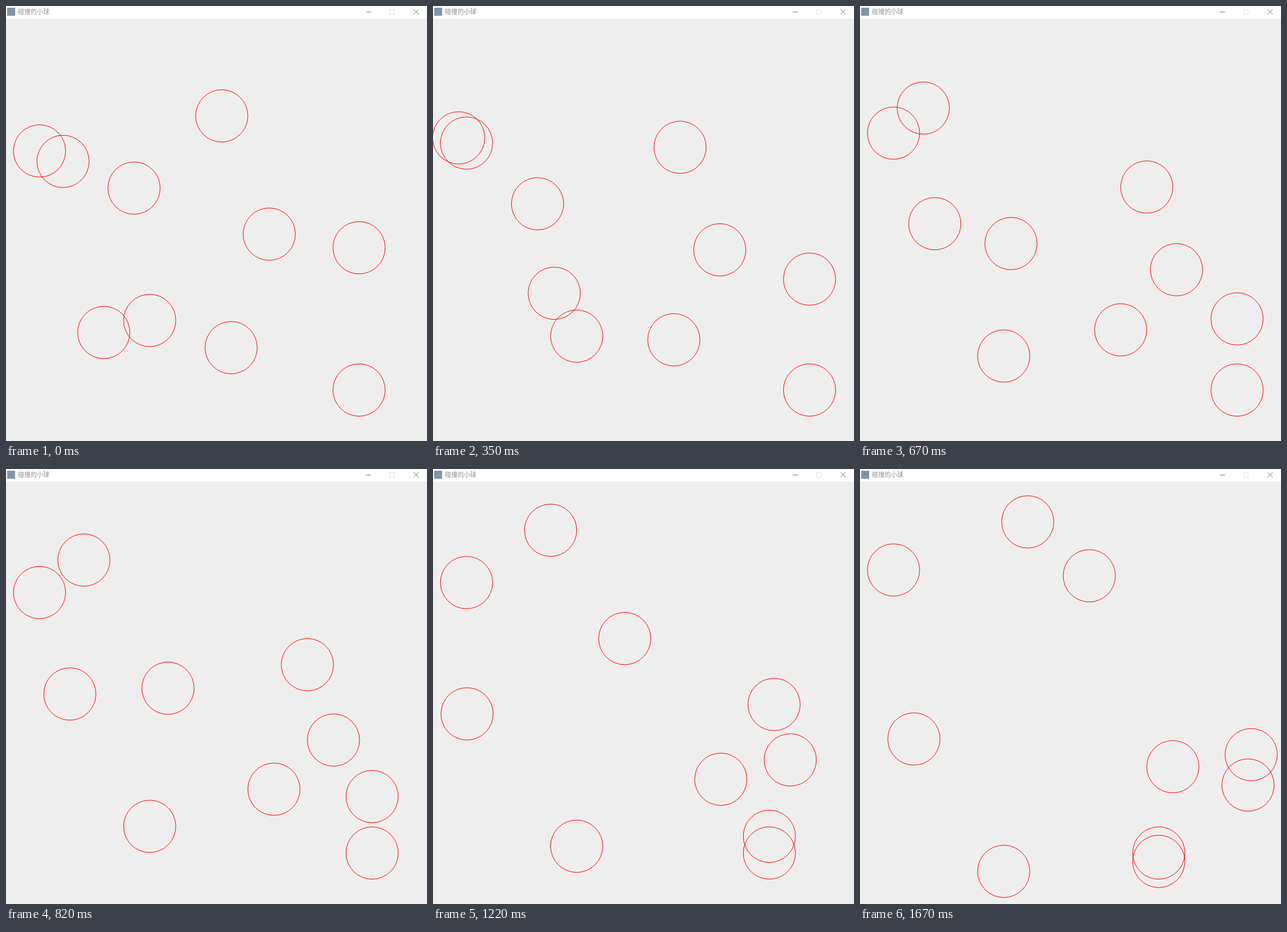
An HTML page with a canvas that plays this animation: 737x760 px, repeating every 1.75 s.

```html
<!DOCTYPE html>
<html lang="zh">
<head>
<meta charset="utf-8">
<style>
  html, body { margin: 0; width: 737px; height: 760px; overflow: hidden; background: #eee; }
  canvas { display: block; }
</style>
</head>
<body>
<canvas id="stage" width="737" height="760"></canvas>
<script>
const ctx = document.getElementById('stage').getContext('2d');
const LOOP = 1750;
const REFRESH = 76;   // typical time between screen refreshes, ms
const SCALE = 0.914;  // simulation units to pixels
const LIMIT = 700;    // farthest position of a ball on either axis
const RADIUS = 50 * SCALE;
const ORIGIN = { x: 45, y: 67.7 };  // centre of a ball at position 0, 0
const BAR = 22;

const ball = (x, y, vx, vy) => ({ x, y, vx, vy });
const balls = [
  ball(364, 136, 4, 4),
  ball(196, 274, -3, 2),
  ball(15, 203, 0, -1),
  ball(60, 223, -4, -3),
  ball(627, 388, 3, 4),
  ball(627, 660, 3, 0),
  ball(455, 362, 3, 2),
  ball(138, 550, 3, -5),
  ball(226, 527, 0, 2),
  ball(382, 579, 2, -1)
];

// The simulation runs at about one tick per 20 ms, slightly unevenly
const pace = [
  [0, 0], [210, 11], [530, 26], [580, 30], [820, 41],
  [1220, 60], [1280, 64], [1460, 72], [1670, 84]
];

// Tick on screen: each stretch is split into equal refreshes
function tickAt(time) {
  const next = pace.findIndex(([t]) => t > time);
  if (next < 0) return pace[pace.length - 1][1];
  const [t0, tick0] = pace[next - 1];
  const [t1, tick1] = pace[next];
  const steps = Math.round((t1 - t0) / REFRESH);
  const done = Math.floor((time - t0) / (t1 - t0) * steps) / steps;
  return Math.floor(tick0 + (tick1 - tick0) * done + 0.4);
}

// Moves along one axis, stopping at a wall for a tick before turning back
function travel(pos, speed, count) {
  for (let i = 0; i < count; i++) {
    pos += speed;
    if (pos < 0 || pos >= LIMIT) {
      pos = pos < 0 ? 0 : LIMIT;
      speed = -speed;
    }
  }
  return pos;
}

function line(x1, y1, x2, y2) {
  ctx.beginPath();
  ctx.moveTo(x1, y1);
  ctx.lineTo(x2, y2);
  ctx.stroke();
}

function drawTitleBar() {
  ctx.fillStyle = '#fff';
  ctx.fillRect(0, 0, 737, BAR);
  ctx.fillStyle = '#7f96a8';
  ctx.fillRect(2, 3, 14, 14);
  ctx.fillStyle = '#909090';
  ctx.font = '11px "Noto Sans CJK SC", "Noto Sans CJK", sans-serif';
  ctx.fillText('碰撞的小球', 21, 14);

  ctx.strokeStyle = '#808080';
  line(630, 10.5, 639, 10.5);
  line(713.5, 5.5, 722.5, 14.5);
  line(722.5, 5.5, 713.5, 14.5);
  ctx.strokeStyle = '#e4e4e4';
  ctx.strokeRect(671.5, 6.5, 8, 8);
}

function drawBalls(tick) {
  ctx.strokeStyle = '#f00';
  for (const { x, y, vx, vy } of balls) {
    const cx = ORIGIN.x + travel(x, vx, tick) * SCALE;
    const cy = ORIGIN.y + travel(y, vy, tick) * SCALE;
    ctx.beginPath();
    ctx.arc(cx, cy, RADIUS, 0, Math.PI * 2);
    ctx.stroke();
  }
}

function render(time) {
  ctx.fillStyle = '#eee';
  ctx.fillRect(0, 0, 737, 760);
  ctx.lineWidth = 1;
  drawBalls(tickAt(time));
  drawTitleBar();
}

const start = performance.now();
function loop() {
  render(Math.max(0, performance.now() - start) % LOOP);
  requestAnimationFrame(loop);
}
loop();
</script>
</body>
</html>
```
